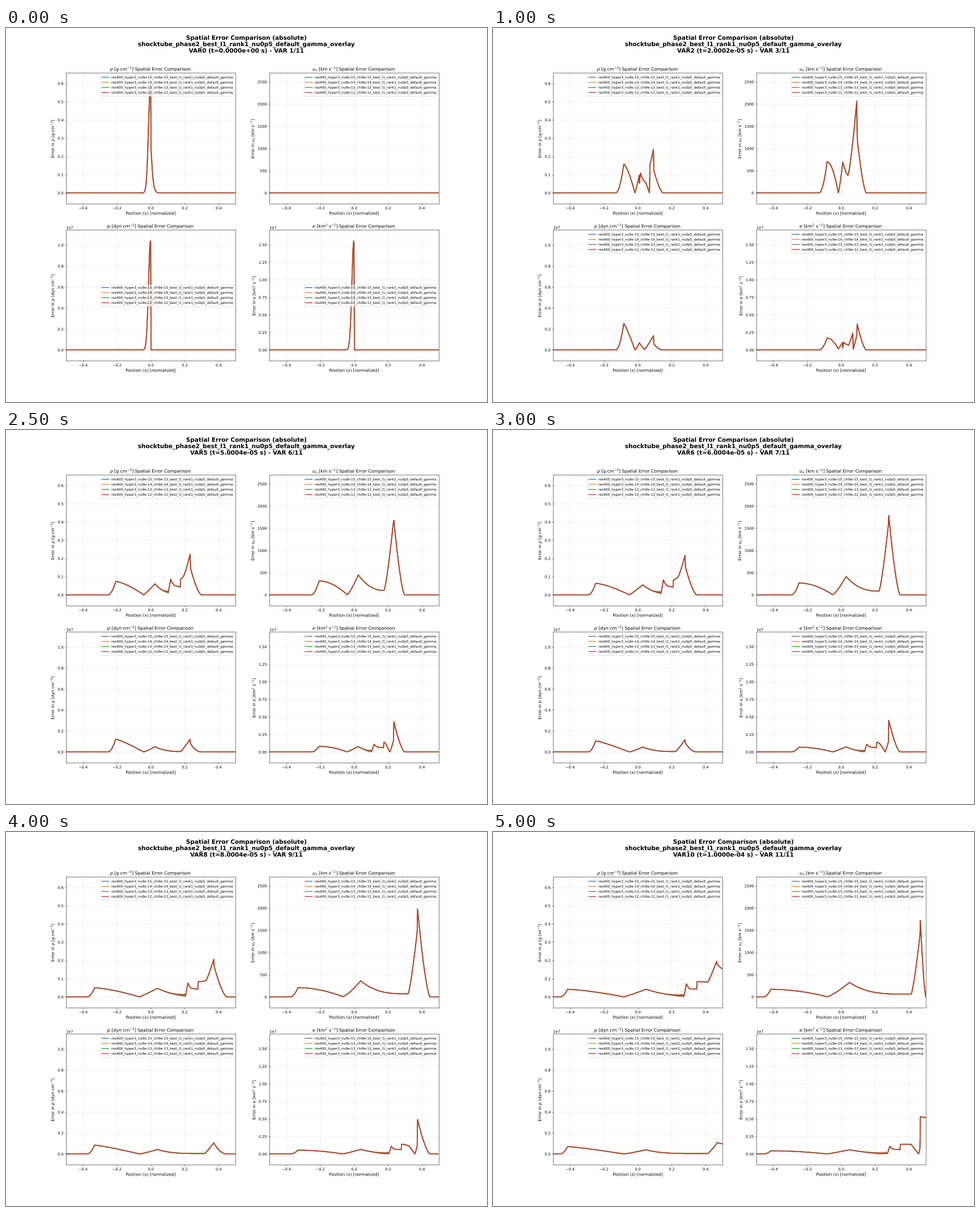
Animation, 849 px wide and 660 px high, one loop 5.5 s. Source, as a matplotlib script:

```python
import numpy as np
import matplotlib.pyplot as plt
from matplotlib.animation import FuncAnimation
from matplotlib.patheffects import Normal
from matplotlib.text import Text

W, H = 849, 660
DPI = W / 18
plt.rcParams["font.family"] = "DejaVu Sans"
plt.rcParams["text.hinting"] = "none"

GRID = np.linspace(-0.5, 0.5, 400)
WALL = 0.5
STAMPS = [0, 1.0003, 2.0002, 3.0001, 4.0003, 5.0004,
          6.0004, 7.0004, 8.0004, 9.0004, 10]
SERIES = [f"res400_hyper3_nu9e-{n}_chi9e-{n}_best_l1_rank1_nu0p5_default_gamma"
          for n in (15, 14, 13, 12)]
RIPPLE = (1.0, 0.9, 1.05, 0.6)

# every wave leaves the membrane at constant speed
WAVES = {
    "foot": lambda t: -0.041 * t - 0.049,
    "crest": lambda t: -0.0415 * t,
    "node": lambda t: -0.0083 * t - 0.0005,
    "hump": lambda t: 0.0049 * t - 0.0003,
    "valley": lambda t: 0.0476 * t - 0.063 + 0.033 / t**2,
    "trough": lambda t: 0.0339 * t - 0.0656,
    "contact": lambda t: 0.0339 * t - 0.0525,
    "ledge": lambda t: 0.0331 * t - 0.0213,
    "step": lambda t: 0.0348 * t - 0.001,
    "lift": lambda t: 0.0348 * t + 0.0015,
    "ramp": lambda t: 0.0435 * t - 0.022,
    "dip": lambda t: 0.0493 * t - 0.036,
    "front": lambda t: 0.0466 * t - 0.0012,
    "back": lambda t: 0.0466 * t + 0.0013,
    "end": lambda t: 0.05 * t + 0.048,
}

# wave: height and bend of the segment leading to it
RHO = {
    "crest": lambda t: (0.28 * t**-0.83, 2),
    "node": lambda t: (0, 1.45),
    "hump": lambda t: (0.145 * t**-0.54, 1.1),
    "trough": lambda t: (0.125 * t**-1.25, -2),
    "contact": lambda t: (0.13 * t**-0.26, 1),
    "ledge": lambda t: (0.07 * t**-0.2, -1.8),
    "step": lambda t: (0.042 * np.clip((t - 3) / 2, 0, 1), 1),
    "lift": lambda t: (max(0.083, 0.2 - 0.0225 * t), 1),
    "ramp": lambda t: (0.205 * t**-0.4, 1.8),
    "front": lambda t: (0.25 - 0.0055 * t, 1.15),
    "back": lambda t: (0.11 + 0.007 * t, 1),
}
VEL = {
    "crest": lambda t: (1287 * t**-0.877, 2),
    "node": lambda t: (4, 1.9),
    "hump": lambda t: (960 * t**-0.47, 1.3),
    "valley": lambda t: (50 + 1470 * t**-2.1, -0.9 - 0.27 * t),
    "front": lambda t: (2455 * t**-0.25, 1.3),
    # velocity has to vanish at the wall
    "back": lambda t: (min(955 * t**0.35, 49000 * (WALL - 0.0465 * t)), 1),
}
PRES = {
    "crest": lambda t: (0.4355 * t**-0.79, 2),
    "node": lambda t: (0, 1.2),
    "hump": lambda t: (0.085 * t**-0.33, 1.2),
    "valley": lambda t: (0.004, -0.4 - 0.42 * t),
    "front": lambda t: (0.146 - 0.005 * t, 1.1),
    "back": lambda t: (0.045 + 0.0065 * t, 1),
}
ENER = {
    "crest": lambda t: (0.304 * t**-0.83, 2),
    "node": lambda t: (0.12 * t**-3, 1.9),
    "hump": lambda t: (0.145 * t**-0.39, 1.1),
    "trough": lambda t: (0.06 / t, -1.8),
    "contact": lambda t: (0.11, 1),
    "ledge": lambda t: (0.068, -1.8),
    "step": lambda t: (max(0.061, 0.4 - 0.08 * t), 1),
    "lift": lambda t: (0.138, 1),
    "ramp": lambda t: (0.0135 * t, 2),
    "dip": lambda t: (0.14 * t**-4, 1),
    "front": lambda t: (0.24 - 0.0165 * t, 1.1),
    "back": lambda t: (0.33 + 0.02 * t, 1),
}


class Panel:
    def __init__(self, sym, unit, waves, peak, scale=1, ripple=0, fall=1.5, wall=0, far=0):
        self.sym, self.unit, self.waves = sym, unit, waves
        self.peak, self.scale, self.ripple = peak, scale, ripple
        self.fall, self.wall, self.far = fall, wall, far

    def start(self):
        """Smoothed jump at the membrane before anything moves."""
        if self.waves is VEL:
            return GRID, 0 * GRID
        left = self.peak * np.exp(-0.5 * ((GRID + 0.002) / 0.0118) ** 2)
        right = self.far * np.exp(-(np.abs(GRID) / 0.0115) ** 1.3)
        return GRID, np.where(GRID < 0, left, right)

    def knots(self, t):
        """Yield x, height and bend; no wave passes the one ahead or the wall."""
        x = WAVES["foot"](t)
        yield x, 0, 1
        for name, rule in self.waves.items():
            x = max(x, WAVES[name](t))
            height, k = rule(t)
            yield x, height, k
        last = WAVES["end"](t)
        yield min(last, WALL), self.wall * height * (last > WALL), -self.fall

    def profile(self, t, gain):
        if t == 0:
            return self.start()
        knots = list(self.knots(t))
        x = np.sort(np.concatenate([GRID, [k[0] for k in knots]]))
        y = np.zeros_like(x)
        for (x0, y0, _), (x1, y1, k) in zip(knots, knots[1:]):
            if x1 > x0:
                m = (x >= x0) & (x <= x1)
                y[m] = y0 + (y1 - y0) * bend((x[m] - x0) / (x1 - x0), k)
        if self.ripple and t > 1:
            a, b = WAVES["hump"](t), WAVES["trough"](t)
            swell = np.clip((x - a) / abs(b - a), 0, 1) ** 2.5 * (x < b)
            y = np.abs(y + self.ripple * gain * swell * np.sin(2 * np.pi * (x - b) / 0.0125))
        return x, y * self.scale


def bend(s, k):
    s = np.clip(s, 0, 1)
    return s**k if k > 0 else 1 - (1 - s) ** -k


PANELS = [
    Panel(r"$\rho$", r"[g cm$^{-3}$]", RHO, 0.598, ripple=0.008, wall=0.86, far=0.25),
    Panel(r"$u_x$", r"[km s$^{-1}$]", VEL, 2455),
    Panel(r"$p$", r"[dyn cm$^{-2}$]", PRES, 1.0394e7, scale=1e7, fall=2, wall=0.88),
    Panel(r"$e$", r"[km$^2$ s$^{-2}$]", ENER, 1.5537e7, scale=1e7, ripple=0.022, wall=0.98),
]

fig, axes = plt.subplots(2, 2, figsize=((W + 1e-6) / DPI, (H + 1e-6) / DPI), dpi=DPI)
fig.subplots_adjust(left=0.125, right=0.9, bottom=0.11, top=0.88,
                    wspace=0.2, hspace=0.2)
heading = fig.suptitle("", fontsize=16, fontweight="bold")
lines, legends = [], []

for ax, p in zip(axes.flat, PANELS):
    lines.append([ax.plot([], [], lw=2.5, alpha=0.8, label=s, snap=False)[0]
                  for s in SERIES])
    ax.set_xlim(-0.5, 0.5)
    ax.set_ylim(-0.1 * p.peak, 1.1 * p.peak)
    ax.set_title(f"{p.sym} {p.unit} Spatial Error Comparison", fontsize=12)
    ax.set_xlabel("Position (x) [normalized]", fontsize=11)
    ax.set_ylabel(f"Error in {p.sym} {p.unit}", fontsize=11)
    ax.grid(True, alpha=0.3)
    legend = ax.legend(fontsize=9, loc="upper right")
    for handle in legend.get_lines():
        handle.set_snap(False)
    legends.append(legend)

# draw glyphs as outlines, which keeps small text at subpixel positions
fig.canvas.draw()
for label in fig.findobj(Text):
    label.set_path_effects([Normal()])


def update(i):
    heading.set_text("Spatial Error Comparison (absolute)\n"
                     "shocktube_phase2_best_l1_rank1_nu0p5_default_gamma_overlay\n"
                     f"VAR{i} (t={STAMPS[i] * 1e-5:.4e} s) - VAR {i + 1}/{len(STAMPS)}")
    for n, (p, group) in enumerate(zip(PANELS, lines)):
        for line, gain in zip(group, RIPPLE):
            line.set_data(*p.profile(float(i), gain))
        legends[n].set_loc("center right" if i == 0 and n > 1 else "upper right")
    return [heading, *sum(lines, []), *legends]


anim = FuncAnimation(fig, update, frames=len(STAMPS), interval=500,
                     init_func=lambda: update(0), repeat=True, repeat_delay=0)
plt.show()
```
